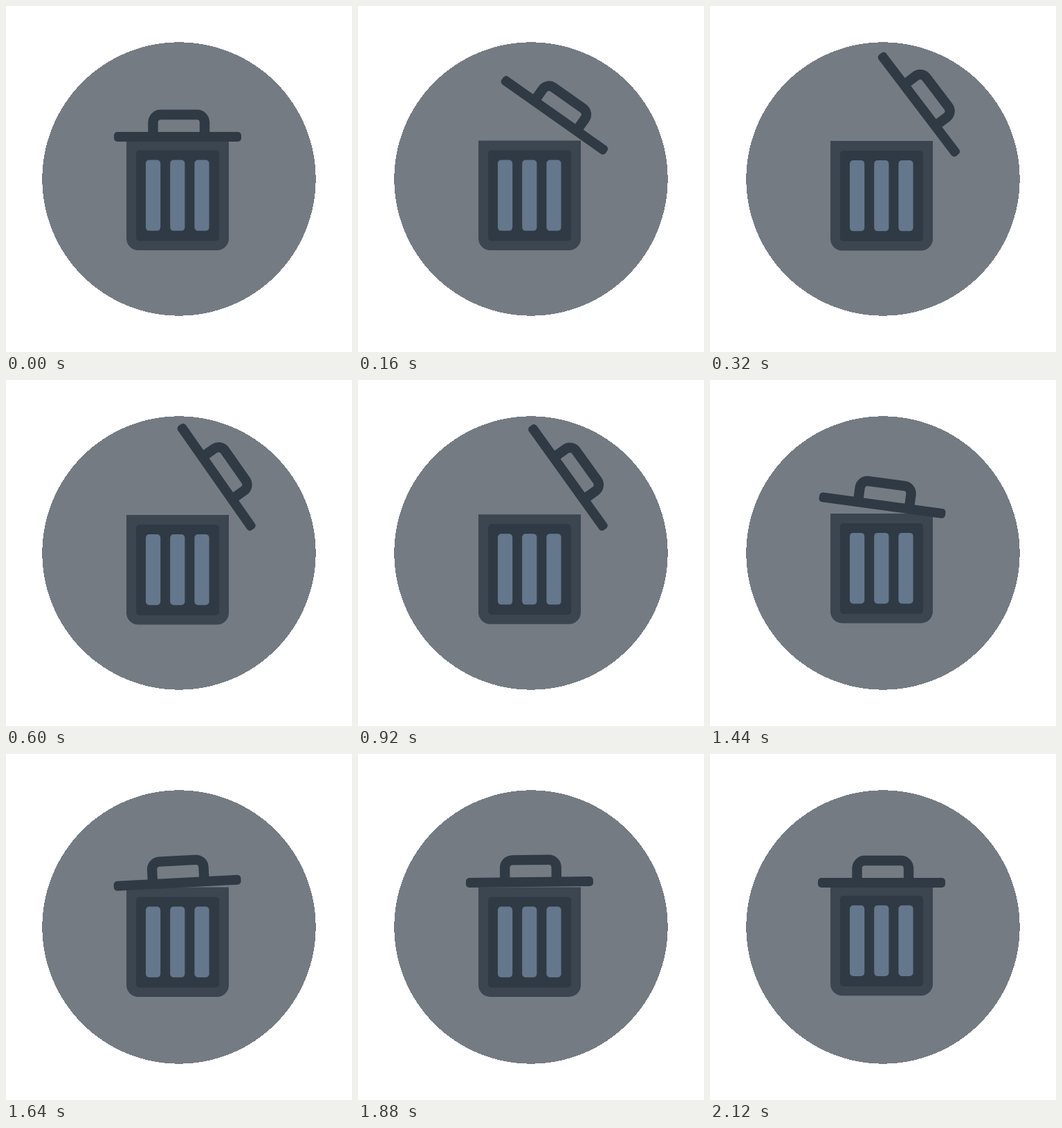
These frames come from a looping animation (500x500 px, 2.76 s). An HTML page:

```html
<!DOCTYPE html>
<html lang="en">
<head>
<meta charset="utf-8">
<title>Bin</title>
<style>
  html, body { margin: 0; height: 100%; overflow: hidden; background: #fff; }
  svg { display: block; width: 100%; height: 100%; }
</style>
</head>
<body>
<svg viewBox="0 0 500 500">
  <circle cx="250" cy="250" r="197.66" fill="#757b83" shape-rendering="crispEdges"/>
  <g id="can">
    <path d="M174 194.5H322V336a17 17 0 0 1-17 17H191a17 17 0 0 1-17-17Z" fill="#3c4650"/>
    <rect x="188" y="208.5" width="120" height="131" rx="5" fill="#2f3a44"/>
    <g fill="#64778c">
      <rect x="202" y="222.5" width="21.2" height="102.3" rx="5"/>
      <rect x="237.2" y="222.5" width="21.2" height="102.3" rx="5"/>
      <rect x="272.4" y="222.5" width="21.2" height="102.3" rx="5"/>
    </g>
  </g>
  <g id="lid">
    <rect x="-92" y="-7" width="184" height="14" rx="5" fill="#2f3a44"/>
    <path d="M-35.5 0V-21a11 11 0 0 1 11-11H28a11 11 0 0 1 11 11V0" fill="none" stroke="#2f3a44" stroke-width="14.4"/>
  </g>
</svg>
<script>
const LOOP = 2760, STEP = 40, END = 2120, SLAM = 1160;
const OPEN_ANGLE = 55, OPEN_TIME = 400, CLOSE_START = 890;
const { PI, sin, cos, exp, abs, min, max } = Math;
const can = document.getElementById('can');
const lid = document.getElementById('lid');

// The can sways around the slam while it slowly rises.
function canY(t) {
  const s = t - SLAM;
  return 3.2 * cos(PI * s / 720) ** 2 * exp(-abs(s) / 650) - 4 * (t / END) ** 2;
}

// The lid swings open with an ease-out and falls shut with an ease-in.
function swing(t) {
  const up = min(t / OPEN_TIME, 1);
  const down = max((t - CLOSE_START) / (SLAM + 2 - CLOSE_START), 0);
  const angle = OPEN_ANGLE * (1 - (1 - up) ** 2 - down ** 2);
  return [angle * 1.02, angle * -0.885, angle];
}

// After the slam it rattles with a damped wave.
function rattle(t) {
  const u = (t - SLAM) / (END - SLAM);
  const angle = 19.5 * (1 - u) ** 2 * sin(2.4 * PI * u + 0.03);
  return [angle * 0.13, -0.6 * angle - 3 * u - 3 * sin(PI * u), angle];
}

function draw(now) {
  const t = min(Math.floor(now % LOOP / STEP) * STEP, END);
  const [x, y, angle] = t < SLAM ? swing(t) : rattle(t);
  can.setAttribute('transform', `translate(0 ${canY(t)})`);
  lid.setAttribute('transform', `translate(${248 + x} ${189 + y}) rotate(${angle})`);
}

const start = performance.now();
function tick() {
  draw(performance.now() - start);
  requestAnimationFrame(tick);
}
tick();
</script>
</body>
</html>
```
